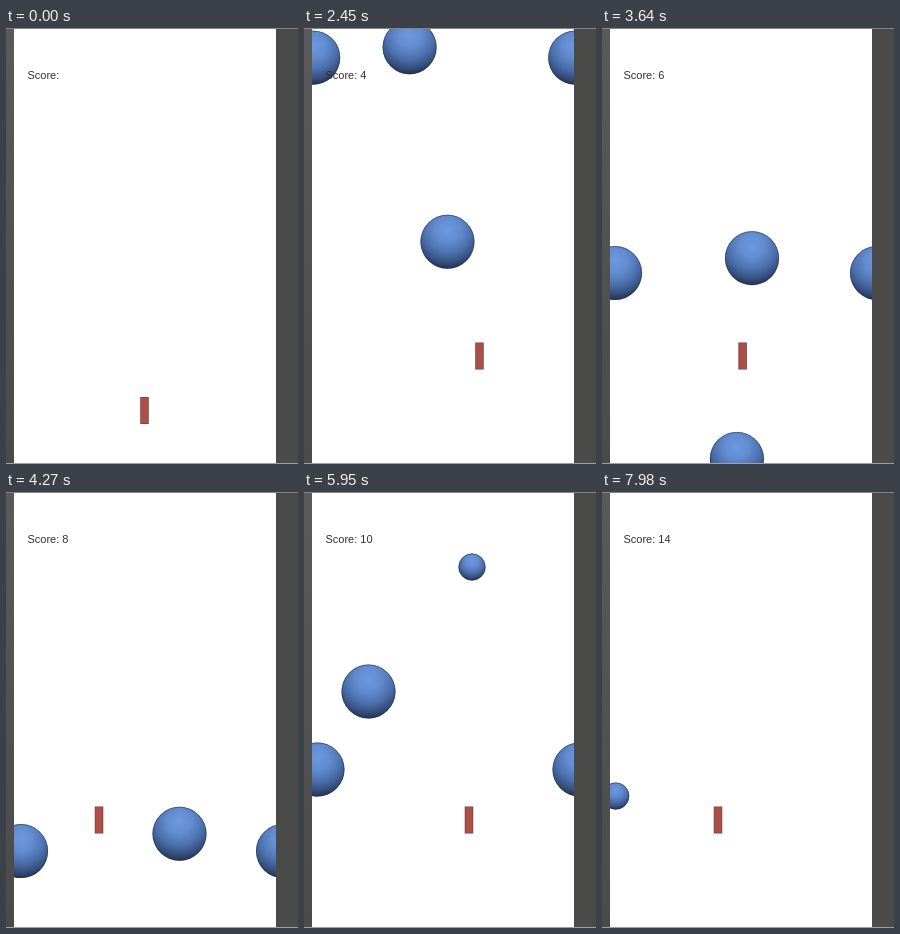
These frames come from a looping animation (292x436 px, 8000 ms). An HTML page with a canvas:

```html
<!DOCTYPE html>
<html lang="en">
<head>
<meta charset="utf-8">
<title>Dodge the balls</title>
<style>
  html, body { margin: 0; width: 100%; height: 100%; overflow: hidden; background: #4a4a48; }
  #stage { position: relative; width: 292px; height: 436px; overflow: hidden; }
  canvas { position: absolute; left: 0; top: 0; width: 292px; height: 436px; }
  #score {
    position: absolute; left: 21.5px; top: 41px;
    font: 11px/13px "Liberation Sans", Arial, sans-serif;
    color: #303030; white-space: pre;
  }
</style>
</head>
<body>
<div id="stage">
  <canvas id="view"></canvas>
  <div id="score">Score:</div>
</div>
<script>
const W = 292, H = 436, LOOP = 8000, STEP = 70;
const LEFT = 8, RIGHT = 270, START = 840, PLAY = 1330;

const view = document.getElementById('view');
const label = document.getElementById('score');
const ctx = view.getContext('2d');
const dpr = window.devicePixelRatio || 1;
view.width = W * dpr;
view.height = H * dpr;
ctx.scale(dpr, dpr);

// A known position at a known time, and the velocity in px per ms
const balls = [
  { r: 27,   t: 1750, x: 148.5, y: 86,  vx: -0.0072, vy: 0.1825 },
  { r: 27,   t: 3010, x: 126.5, y: 118.5, vx: 0.0373, vy: 0.1772 },
  { r: 27,   t: 3010, x: 11,  y: 131, vx: 0.0032,  vy: 0.181 },
  { r: 27,   t: 5950, x: 13.5, y: 277.5, vx: 0.003, vy: 0.182 },
  { r: 27,   t: 5950, x: 64.5, y: 199.5, vx: -0.036, vy: 0.1804 },
  { r: 13.5, t: 5950, x: 168, y: 75,  vx: -0.008,  vy: 0.184 },
  { r: 13.5, t: 7070, x: 11,  y: 132, vx: 0.003,   vy: 0.189 }
];

// Player centre: [time, x]
const route = [
  [2030, 138.5], [2700, 197.5], [3150, 197.5], [4050, 93], [4500, 93],
  [5500, 165], [6150, 165], [6900, 99.5], [7200, 99.5], [7700, 116]
];

function playerX(t) {
  if (t <= route[0][0]) return route[0][1];
  for (let i = 1; i < route.length; i++) {
    const [t0, x0] = route[i - 1], [t1, x1] = route[i];
    if (t < t1) return x0 + (x1 - x0) * (t - t0) / (t1 - t0);
  }
  return route[route.length - 1][1];
}

function scoreText(t) {
  if (t < START) return 'Score:';
  return 'Score: ' + 2 * Math.max(0, Math.floor((t - 100) / 1000)) * (t >= PLAY);
}

function fillRect(color, x, y, w, h) {
  ctx.fillStyle = color;
  ctx.fillRect(x, y, w, h);
}

function drawBall(x, y, r) {
  const shade = ctx.createRadialGradient(x, y - r * 0.45, 0, x, y - r * 0.45, r * 1.48);
  shade.addColorStop(0, '#6d98df');
  shade.addColorStop(0.3, '#638dd1');
  shade.addColorStop(0.6, '#4c70ac');
  shade.addColorStop(0.82, '#36507f');
  shade.addColorStop(1, '#222d46');
  ctx.fillStyle = shade;
  ctx.beginPath();
  ctx.arc(x, y, r, 0, Math.PI * 2);
  ctx.fill();
  ctx.lineWidth = 0.8;
  ctx.strokeStyle = 'rgba(35,45,70,.65)';
  ctx.beginPath();
  ctx.arc(x, y, r - 0.4, 0, Math.PI * 2);
  ctx.stroke();
}

function drawBalls(t) {
  ctx.save();
  ctx.beginPath();
  ctx.rect(LEFT, 1, RIGHT - LEFT, H - 2);
  ctx.clip();
  for (const b of balls) {
    const x = b.x + b.vx * (t - b.t), y = b.y + b.vy * (t - b.t);
    if (y < -b.r || y > H + b.r) continue;
    drawBall(x, y, b.r);
    // Near the edge a twin shows on the far side
    if (x - LEFT < b.r * 0.4) drawBall(x + RIGHT - LEFT, y, b.r);
  }
  ctx.restore();
}

function drawPlayer(x, y) {
  fillRect('#7f3d38', x - 4.25, y, 8.5, 27);
  fillRect('#ab5049', x - 3.5, y + 0.7, 7, 25.6);
}

function drawBoard() {
  fillRect('#4a4a48', 0, 0, W, H);
  const side = ctx.createLinearGradient(0, 0, 0, H);
  side.addColorStop(0, '#5a5a5a');
  side.addColorStop(1, '#4a4a4a');
  fillRect(side, 0, 0, LEFT, H);
  fillRect('#fff', LEFT, 0, RIGHT - LEFT, H);
  fillRect('#858585', 0, 0, W, 1);
  fillRect('#a0a0a0', 0, H - 1, W, 1);
}

function draw(now) {
  const ms = now % LOOP;
  const t = Math.floor(ms / STEP) * STEP;
  drawBoard();
  if (t >= PLAY) drawBalls(t);
  drawPlayer(playerX(t), t < START ? 369 : 314.5);
  const text = scoreText(t);
  if (label.textContent !== text) label.textContent = text;
}

const begin = performance.now();
function tick() {
  draw(performance.now() - begin);
  requestAnimationFrame(tick);
}
tick();
</script>
</body>
</html>
```
